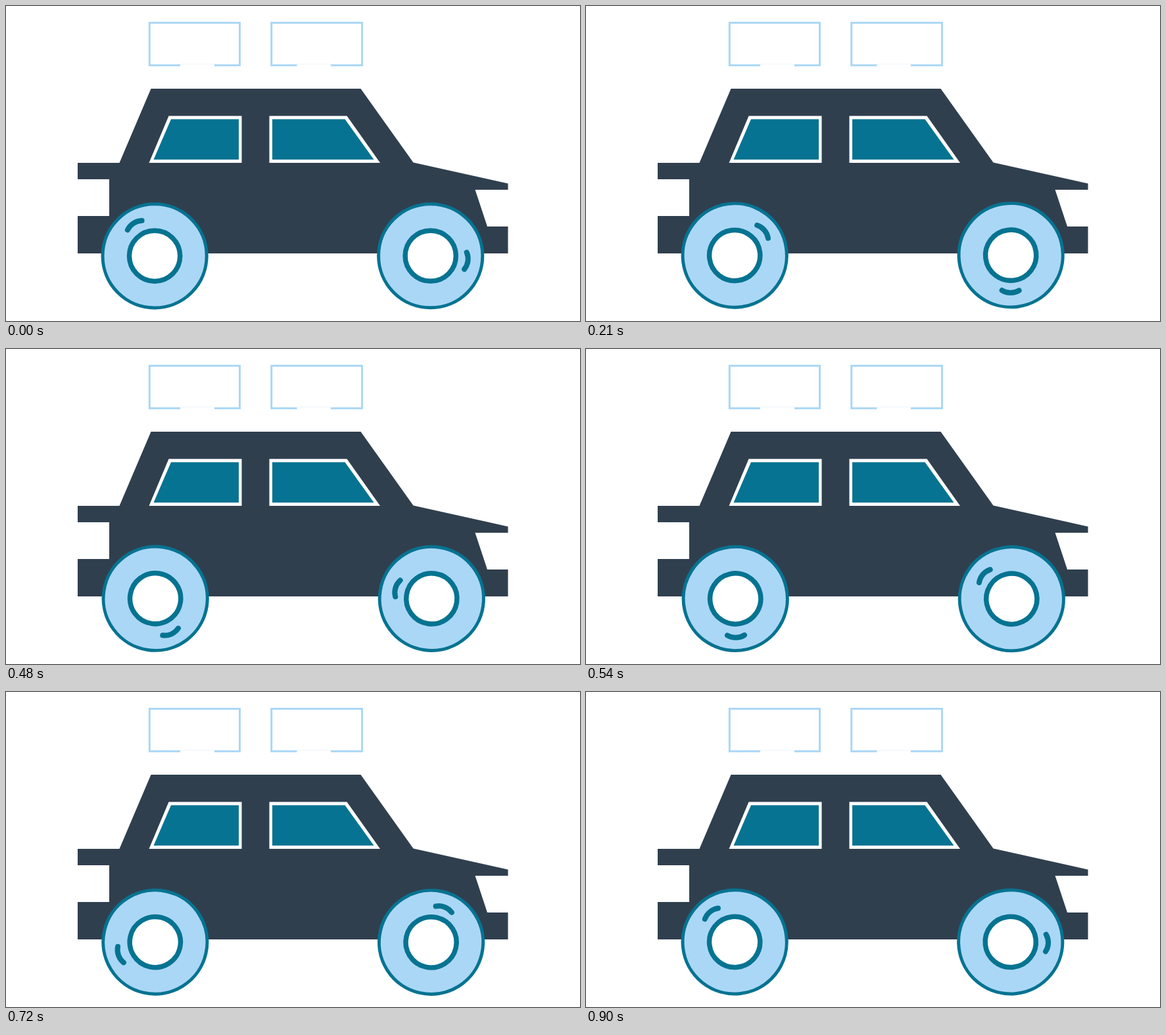
An HTML page that plays this animation: 873 by 480 pixels, repeating every 930 ms.

```html
<!DOCTYPE html>
<html lang="en">
<head>
<meta charset="utf-8">
<title>Car with spinning wheels</title>
<style>
  html, body { margin: 0; width: 100%; height: 100%; overflow: hidden; background: #fff; }
  svg { display: block; }
  .body { fill: #303f4e; }
  .frame { fill: #fff; }
  .glass { fill: #057391; }
  .case { fill: none; stroke: #abd7f6; stroke-width: 3; }
  .tyre { fill: #abd7f6; stroke: #057391; stroke-width: 5; }
  .hub { fill: #fff; stroke: #057391; stroke-width: 7.5; }
  .shine { fill: none; stroke: #057391; stroke-width: 8; stroke-linecap: round; }
</style>
</head>
<body>
<svg width="873" height="480" viewBox="0 0 873 480">
  <rect class="case" x="218.3" y="25.6" width="137.2" height="64.7"/>
  <rect class="case" x="403.7" y="25.6" width="137.8" height="64.7"/>
  <path class="frame" d="M265 89h52v4h-52zM442.500 89h51.500v4h-51.500z"/>

  <path class="body" d="M220.500 126H539.500L619.500 238.500L763.500 270.500V280H713.500L732 336H763.500V377H109V320H157V264H109V239H172.500Z"/>
  <path class="frame" d="M247.500 167.500H358.500V239H217.500ZM400.500 167.500H518.500L569 239H400.500Z"/>
  <path class="glass" d="M251 172.500H354V234H224.500ZM405 172.500H515.500L559.500 234H405Z"/>

  <g id="wheels"></g>
</svg>
<script>
  const STEP = 30, LOOP = 930, TURN = 11.79;

  // Each wheel spins about a pivot slightly off its own centre.
  const wheels = [
    { x: 226.6, y: 380.5, dx: -.5, dy: .35, shine: -123, r: 55.7 },
    { x: 646.5, y: 380.5, dx: -.8, dy: .25, shine: 8, r: 53.7 },
  ];

  const group = document.getElementById('wheels');
  group.innerHTML = wheels.map(w => `
    <g><g transform="translate(${w.dx} ${w.dy})">
      <circle class="tyre" r="79.1"/>
      <circle class="hub" r="38.6"/>
      <path class="shine" d="M${w.r} -13A25 25 0 0 1 ${w.r} 13" transform="rotate(${w.shine})"/>
    </g></g>`).join('');

  const start = performance.now();

  function draw() {
    const time = (performance.now() - start) % LOOP;
    const angle = Math.floor(time / STEP) * TURN;
    wheels.forEach((w, i) =>
      group.children[i].setAttribute('transform', `translate(${w.x} ${w.y}) rotate(${angle})`));
    requestAnimationFrame(draw);
  }
  draw();
</script>
</body>
</html>
```
